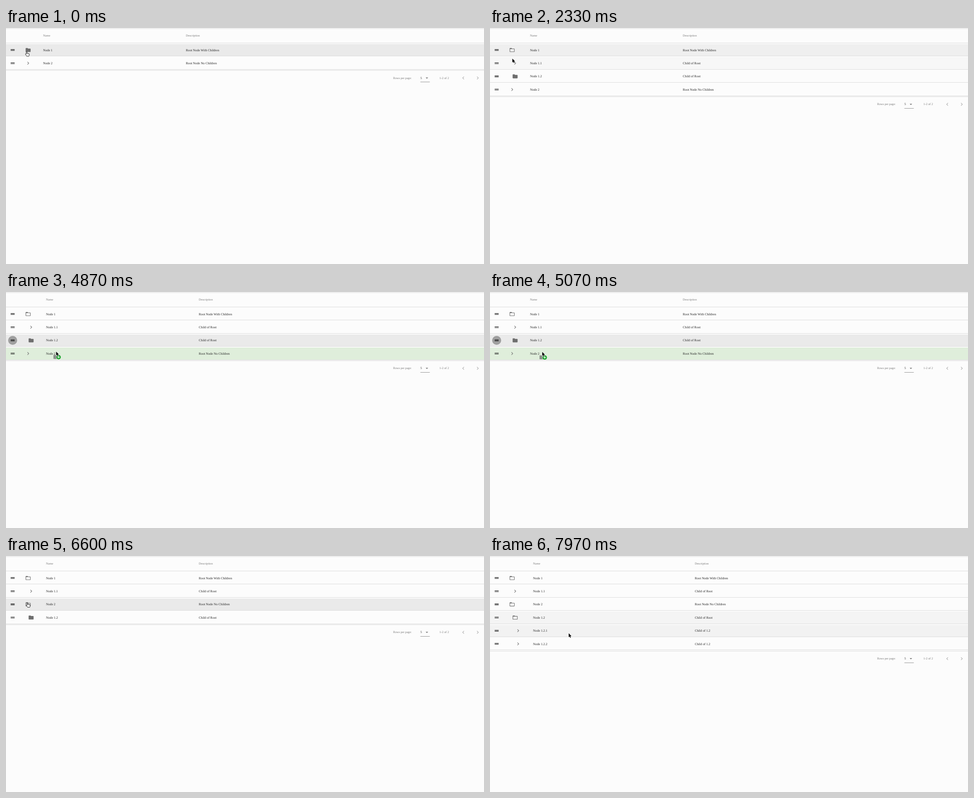
An HTML page with a canvas that plays this animation: 1063 by 527 pixels, repeating every 8 s.

```html
<!DOCTYPE html>
<html lang="en">
<head>
<meta charset="utf-8">
<title>Tree table</title>
<style>
html, body { margin: 0; width: 100%; height: 100%; overflow: hidden; background: #fcfcfc; }
canvas { display: block; width: 1063px; height: 527px; }
</style>
</head>
<body>
<canvas id="stage"></canvas>
<script>
const W = 1063, H = 527, LOOP = 8000;
const ROW = 29.4, TOP = 36, UNIT = 0.553;
const canvas = document.getElementById('stage');
const ctx = canvas.getContext('2d');
const dpr = window.devicePixelRatio || 1;
canvas.width = Math.round(W * dpr);
canvas.height = Math.round(H * dpr);

const folder = 'M10 4H4c-1.1 0-1.99.9-1.99 2L2 18c0 1.1.9 2 2 2h16c1.1 0 2-.9 2-2V8c0-1.1-.9-2-2-2h-8l-2-2z';
const icons = {
  closed: new Path2D(folder),
  open: new Path2D(folder + 'M20 18H4V8h16z'),
  leaf: new Path2D('M10 6L8.59 7.41 13.17 12l-4.58 4.59L10 18l6-6z'),
  back: new Path2D('M15.41 16.59L10.83 12l4.58-4.59L14 6l-6 6 6 6z'),
  drop: new Path2D('M7 10l5 5 5-5z'),
  handle: new Path2D('M20 9H4v2h16zM4 15h16v-2H4z')
};

// Cursor shapes, hotspot at 0,0
const shapes = {
  arrow: new Path2D('M0 0V9L2 7.1 3.4 10.2 4.9 9.5 3.5 6.5H6.2z'),
  hand: new Path2D('M-1 .8C-1-.3 .8-.3 .8 .8V4C1.2 3.4 2.4 3.5 2.6 4.3 3.2 3.8 4.2 4 4.3 4.8 5 4.5 5.7 4.9 5.7 5.7V7.6C5.7 8.8 4.9 9.2 4.9 10.5H-.1C-.4 9-2.2 7.6-2.9 6.1-3.2 5.1-2 4.9-1 6z'),
  move: new Path2D('M0-4.4L1.9-2.3H.7V-.7H2.3V-1.9L4.4 0 2.3 1.9V.7H.7V2.3H1.9L0 4.4-1.9 2.3H-.7V.7H-2.3V1.9L-4.4 0-2.3-1.9V-.7H-.7V-2.3H-1.9z')
};

const node = (id, icon, depth, text) => ({ name: 'Node ' + id, icon, depth, text });
const n1 = icon => node('1', icon, 0, 'Root Node With Children');
const n2 = icon => node('2', icon, 0, 'Root Node No Children');
const n11 = node('1.1', 'leaf', 1, 'Child of Root');
const n12 = icon => node('1.2', icon, 1, 'Child of Root');
const kids = ['1.2.1', '1.2.2'].map(id => node(id, 'leaf', 2, 'Child of 1.2'));

const oneOpen = [n1('open'), n11, n12('closed'), n2('leaf')];
const trees = [
  [0, [n1('closed'), n2('leaf')]],
  [30, oneOpen],
  [2700, [n1('open'), n11, n12('open'), ...kids, n2('leaf')]],
  [3970, oneOpen],
  [5500, [n1('open'), n11, n2('closed')]],
  [6600, [n1('open'), n11, n2('open'), n12('closed')]],
  [7430, [n1('open'), n11, n2('open'), n12('open'), ...kids]]
];

// Left edges of the name and description columns by deepest level
const columns = [[82.5, 400], [89, 428.8], [95.8, 455.4]];

const path = [
  [0, 46, 52.5], [2130, 46, 52.5], [2700, 59, 107.3], [3970, 59, 107.3],
  [4350, 15, 108], [4480, 15, 108], [4870, 111.5, 133], [5500, 131, 136.5],
  [5630, 131, 136.5], [6430, 48, 104], [6600, 48, 104], [7400, 56, 133],
  [7700, 56, 133], [7970, 175, 172.5], [8000, 175, 172.5]
];
const cursors = [
  [0, 'hand'], [2240, 'arrow'], [2600, 'hand'], [4060, 'arrow'], [4270, 'move'],
  [4480, 'drag'], [5500, 'move'], [5650, 'arrow'], [6330, 'hand'],
  [6870, 'arrow'], [7180, 'hand'], [7760, 'arrow']
];
const hovers = [
  [-1000, 0], [2287, 1], [2506, 2], [5500, -1], [6000, 2], [7064, 3], [7890, 4]
];

const clamp = v => Math.max(0, Math.min(1, v));
const smooth = v => v * v * (3 - 2 * v);
const indexAt = (list, t) => {
  let i = 0;
  while (i + 1 < list.length && list[i + 1][0] <= t) i++;
  return i;
};
const at = (list, t) => list[indexAt(list, t)][1];

function pointer(t) {
  const i = Math.min(indexAt(path, t), path.length - 2);
  const [t0, x0, y0] = path[i], [t1, x1, y1] = path[i + 1];
  const k = smooth(clamp((t - t0) / (t1 - t0)));
  return [x0 + (x1 - x0) * k, y0 + (y1 - y0) * k];
}

function text(str, x, y, size, color) {
  ctx.font = size + 'px "Liberation Serif", "Times New Roman", serif';
  ctx.fillStyle = color;
  ctx.fillText(str, x, y);
}

function icon(name, x, y, color) {
  ctx.save();
  ctx.translate(x, y);
  ctx.scale(UNIT, UNIT);
  ctx.translate(-12, -12);
  ctx.fillStyle = color;
  ctx.fill(icons[name], 'evenodd');
  ctx.restore();
}

function rect(x, y, w, h, color) {
  ctx.fillStyle = color;
  ctx.fillRect(x, y, w, h);
}

function disc(x, y, r, color) {
  ctx.fillStyle = color;
  ctx.beginPath();
  ctx.arc(x, y, r, 0, Math.PI * 2);
  ctx.fill();
}

const line = y => rect(0, Math.round(y), W, 1, '#dcdcdc');

function shade(row, color) {
  if (row < 0) return;
  const y = Math.round(TOP + ROW * row);
  rect(0, y, W, Math.round(62.4 + ROW * row) - y, color);
}

function drawHover(t) {
  const i = indexAt(hovers, t), [start, row] = hovers[i];
  const k = clamp((t - start) / 150);
  const grey = a => `rgba(0,0,0,${0.07 * a})`;
  shade(row, grey(k));
  if (i && row >= 0) shade(hovers[i - 1][1], grey(1 - k));
}

function drawFooter(n) {
  const y = 52.8 + ROW * n;
  text('Rows per page:', 861, y + 2, 6.64, '#757575');
  text('5', 921.5, y + 2, 6.64, '#222');
  icon('drop', 936, y, '#757575');
  rect(921.5, Math.round(y + 8.6), 21, 1, '#949494');
  text('1-2 of 2', 964, y + 2, 6.64, '#757575');
  icon('back', 1017, y, '#a9a9a9');
  icon('leaf', 1049, y, '#a9a9a9');
}

function drawTable(t) {
  const rows = at(trees, t);
  const depth = Math.max(...rows.map(r => r.depth));
  const [nameX, textX] = columns[depth];
  line(1);
  line(33);
  text('Name', nameX, 19.3, 6.64, '#757575');
  text('Description', textX, 19.3, 6.64, '#757575');
  drawHover(t);
  if (t >= 4700 && t < 5500) shade(3, '#dfeedb');
  if (t >= 4400 && t < 5500) {
    disc(14.8, 108, 10 * smooth(clamp((t - 4350) / 200)), 'rgba(0,0,0,0.32)');
  }
  rows.forEach((r, i) => {
    const y = 49.2 + ROW * i;
    icon('handle', 14.8, y, '#111');
    icon(r.icon, 49.2 + 6.65 * r.depth, y, '#6e6e6e');
    text(r.name, nameX, y + 2.3, 7.19, '#212121');
    text(r.text, textX, y + 2.3, 7.19, '#212121');
    line(62.4 + ROW * i);
  });
  line(TOP - 0.4 + ROW * rows.length);
  drawFooter(rows.length);
}

function drawCursor(t) {
  const [x, y] = pointer(t);
  const kind = at(cursors, t), drag = kind === 'drag';
  if (drag) {
    ctx.globalAlpha = 0.75;
    icon('closed', x - 0.5, y + 12, '#6e6e6e');
    ctx.globalAlpha = 1;
    disc(x + 5.5, y + 12.5, 5.4, '#fff');
    disc(x + 5.5, y + 12.5, 5, '#1fa52f');
    rect(x + 2.8, y + 11.9, 5.4, 1.2, '#fff');
    rect(x + 4.9, y + 9.8, 1.2, 5.4, '#fff');
  }
  const hand = kind === 'hand', shape = shapes[drag ? 'arrow' : kind];
  ctx.save();
  ctx.translate(x, y);
  ctx.lineJoin = 'round';
  ctx.lineWidth = hand ? 0.9 : 1.2;
  ctx.strokeStyle = hand ? '#111' : '#fff';
  ctx.fillStyle = hand ? '#fff' : '#000';
  if (hand) ctx.fill(shape);
  ctx.stroke(shape);
  if (!hand) ctx.fill(shape);
  if (hand) {
    ctx.lineWidth = 0.5;
    ctx.stroke(new Path2D('M.8 4V5.6M2.6 4.3V5.8M4.3 4.8V6'));
  }
  ctx.restore();
}

function frame(now) {
  const t = now % LOOP;
  ctx.setTransform(dpr, 0, 0, dpr, 0, 0);
  ctx.textRendering = 'geometricPrecision';
  rect(0, 0, W, H, '#fcfcfc');
  drawTable(t);
  drawCursor(t);
  requestAnimationFrame(frame);
}
frame(performance.now());
</script>
</body>
</html>
```
